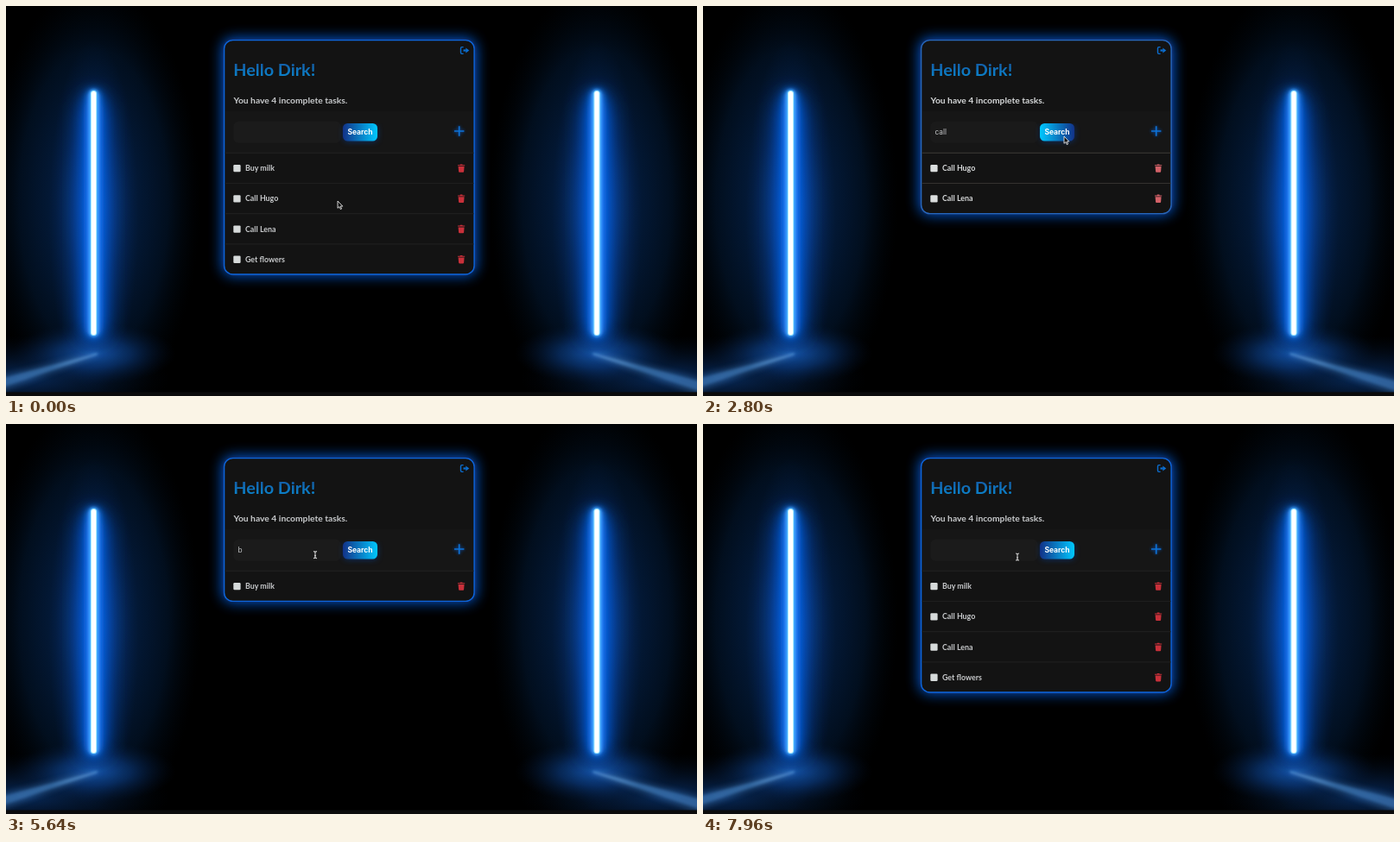
These frames come from a looping animation (800x452 px, 8 s). An HTML page:

```html
<!DOCTYPE html>
<html lang="en">
<head>
<meta charset="utf-8">
<title>Task list</title>
<style>
  html, body { margin: 0; width: 100%; height: 100%; overflow: hidden; background: #000; }
  svg { display: block; width: 800px; height: 452px; }
  text { font-family: Lato, "Open Sans", sans-serif; font-weight: 700; white-space: pre; }
  .ui { font-family: Inter, Roboto, sans-serif; }
</style>
</head>
<body>
<svg viewBox="0 0 800 452">
  <defs>
    <filter id="soft" filterUnits="userSpaceOnUse" x="-60" y="0" width="920" height="470"><feGaussianBlur stdDeviation="1.6"/></filter>
    <filter id="medium" filterUnits="userSpaceOnUse" x="-60" y="0" width="920" height="470"><feGaussianBlur stdDeviation="3.5"/></filter>
    <filter id="wide" filterUnits="userSpaceOnUse" x="-60" y="0" width="920" height="470"><feGaussianBlur stdDeviation="7.5"/></filter>
    <filter id="broad" filterUnits="userSpaceOnUse" x="-60" y="0" width="920" height="470"><feGaussianBlur stdDeviation="13"/></filter>
    <radialGradient id="haze">
      <stop offset="0" stop-color="#0a48a0" stop-opacity=".7"/>
      <stop offset=".35" stop-color="#06306a" stop-opacity=".55"/>
      <stop offset=".7" stop-color="#031a36" stop-opacity=".55"/>
      <stop offset="1" stop-color="#010a14" stop-opacity="0"/>
    </radialGradient>
    <radialGradient id="halo">
      <stop offset="0" stop-color="#1670f0" stop-opacity=".5"/>
      <stop offset="1" stop-color="#063a90" stop-opacity="0"/>
    </radialGradient>
    <radialGradient id="floor">
      <stop offset="0" stop-color="#0b3c82" stop-opacity=".7"/>
      <stop offset="1" stop-color="#04142c" stop-opacity="0"/>
    </radialGradient>
    <radialGradient id="pool">
      <stop offset="0" stop-color="#1a6ad0" stop-opacity=".75"/>
      <stop offset=".45" stop-color="#0d4596" stop-opacity=".5"/>
      <stop offset="1" stop-color="#04183a" stop-opacity="0"/>
    </radialGradient>
    <linearGradient id="beam" gradientUnits="userSpaceOnUse" x1="0" x2="106" y1="0" y2="0">
      <stop offset="0" stop-color="#3a72b0" stop-opacity=".85"/>
      <stop offset=".5" stop-color="#3f7ab8" stop-opacity=".85"/>
      <stop offset="1" stop-color="#7ab4ea"/>
    </linearGradient>
    <linearGradient id="titleFill" x1="0" y1="0" x2="0" y2="1">
      <stop offset=".2" stop-color="#145ca6"/><stop offset=".9" stop-color="#0a84cc"/>
    </linearGradient>
    <linearGradient id="buttonFill" gradientUnits="userSpaceOnUse" x1="0" x2="80" y1="0" y2="0">
      <stop offset="0" stop-color="#123288"/><stop offset=".5" stop-color="#00c8ff"/><stop offset="1" stop-color="#123288"/>
    </linearGradient>
    <g id="lamp">
      <ellipse cx="101.5" cy="226" rx="124" ry="252" fill="url(#haze)"/>
      <ellipse cx="20" cy="432" rx="170" ry="50" fill="url(#floor)"/>
      <ellipse cx="101.5" cy="403" rx="95" ry="36" fill="url(#pool)"/>
      <path d="M106 402L-20 433V452L106 404Z" fill="url(#beam)" opacity=".6" filter="url(#medium)"/>
      <path d="M106 402.3L-20 436V447L106 404Z" fill="url(#beam)" opacity=".7" filter="url(#soft)"/>
      <ellipse cx="101.5" cy="245" rx="52" ry="205" fill="url(#halo)"/>
      <rect x="89" y="108" width="25" height="276" rx="12" fill="#0a55d8" filter="url(#broad)"/>
      <rect x="93" y="98" width="17" height="286" rx="8" fill="#0c68f0" filter="url(#wide)"/>
      <rect x="95" y="97" width="13" height="286" rx="6" fill="#2b90ff" filter="url(#medium)"/>
      <rect x="96.5" y="97" width="10" height="286" rx="5" fill="#4db2ff" filter="url(#soft)"/>
      <rect x="98" y="98" width="7" height="284" rx="3.5" fill="#a9ecff"/>
      <rect x="99" y="99" width="5" height="282" rx="2.5" fill="#fff"/>
    </g>
    <path id="bin" d="M523 185.2v-1h2.4l.5-.8h2.4l.5.8h2.4v1zM523.6 186h7l-.5 6q-.1.8-.9.8h-4.2q-.8 0-.9-.8z"/>
  </defs>

  <rect width="800" height="452"/>
  <g id="room">
    <use href="#lamp"/>
    <use href="#lamp" transform="translate(785.5) scale(-1 1)"/>
  </g>
  <rect y="447.5" width="800" height="5" fill="#0b0b0c"/>
  <rect id="strip" width="800" height="39" fill="#161616"/>

  <rect id="glow" x="250" y="37" width="295" rx="13" fill="#0a5fe0" filter="url(#wide)"/>
  <rect id="card" x="252.6" y="39.6" width="289.5" rx="10" fill="#131313" stroke-width="1.4"/>
  <rect x="254" y="122" width="287" height="48" fill="#161616"/>
  <g id="logout" fill="none" stroke="#0b6ed0" stroke-width="1.4">
    <path d="M529.6 47.6h-1.8q-1.3 0-1.3 1.3v5.2q0 1.3 1.3 1.3h1.8"/>
    <path d="M529.5 51.5h3" stroke-width="2.2"/>
    <path d="M532.3 48.4v6.2l4-3.1z" fill="#0b6ed0" stroke="none"/>
  </g>
  <text x="263.3" y="81" font-size="19.8" fill="url(#titleFill)">Hello Dirk!</text>
  <text class="ink" x="263.4" y="112.6" font-size="10.3">You have 4 incomplete tasks.</text>
  <rect id="field" y="133.8" height="25" rx="6"/>
  <rect id="selection" x="269" y="141" width="14" height="10.5" fill="#56728f"/>
  <text id="query" class="ui" y="149.4" font-size="8.3" style="font-weight:400"></text>
  <rect id="caret" y="141.5" width=".8" height="9.5" fill="#ddd"/>
  <g id="button">
    <rect x="1" y="2" width="39" height="19" rx="5" fill="#0a49b8" opacity=".5" filter="url(#medium)"/>
    <rect width="40" height="20.6" rx="5.5" fill="url(#buttonFill)"/>
    <text class="ui" x="20" y="13.4" font-size="8.5" fill="#fff" text-anchor="middle">Search</text>
  </g>
  <path d="M518.5 145h12M524.5 139v12" stroke="#0a4fb0" stroke-width="4" opacity=".5" filter="url(#soft)"/>
  <path id="plus" d="M519 145h11.4M524.7 139.3v11.4" stroke="#0c73d8" stroke-width="1.6"/>
  <g id="rows"></g>

  <path id="arrow" d="M0 0v8.3l1.9-1.7 1.4 3 1.3-.6-1.4-2.9h2.6z" fill="#111" stroke="#fff" stroke-width=".8"/>
  <path id="ibeam" d="M-2-4q2 0 2 1.3Q0-4 2-4M0-3V3M-2 4q2 0 2-1.3Q0 4 2 4M-1 1H1" fill="none" stroke="#d0d0d0" stroke-width="1.1"/>
</svg>
<script>
const LOOP = 8000, FLASH = 80, FADE = 300, ROW = 35.2;
const tasks = ["Buy milk", "Call Hugo", "Call Lena", "Get flowers"];
const el = id => document.getElementById(id);
const set = (node, attrs) => { for (const k in attrs) node.setAttribute(k, attrs[k]); };
const show = (node, on) => set(node, { visibility: on ? "visible" : "hidden" });
const clamp = v => Math.min(1, Math.max(0, v));
const ease = v => v * v * (3 - 2 * v);
const ramp = (t, start, length) => ease(clamp((t - start) / length));
const mix = (a, b, k) => `rgb(${a.map((v, i) => Math.round(v + (b[i] - v) * k))})`;
const latest = (list, t) => list.filter(e => e[0] <= t).pop();

// [time, value] lists
const typed = [[0, ""], [900, "c"], [1040, "ca"], [1180, "cal"], [1320, "call"],
  [4280, "b"], [6300, "ba"], [6960, "b"], [7080, ""]];
const loads = [[0, tasks], [2520, tasks.slice(1, 3)], [4800, tasks.slice(0, 1)], [7440, tasks]];
const focus = [[0, false], [760, true], [2400, false], [3360, true], [4800, false], [5960, true], [7440, false]];
const pointer = [[0, true], [900, false], [1640, true], [4280, false], [5480, true], [6300, false], [7640, true]];
// [start, duration, x, y]
const moves = [[0, 1, 384, 226], [280, 440, 345, 149], [1640, 440, 418, 151],
  [2860, 420, 355, 150.5], [5480, 420, 364, 154]];

const NS = "http://www.w3.org/2000/svg";
const rows = tasks.map((_, i) => {
  const g = document.createElementNS(NS, "g");
  g.innerHTML = `<path class="rule" d="M253.5 170.3H541.5" stroke-width="1.2"/>
    <rect class="box" x="263.3" y="184" width="8.3" height="8.3" rx="1.2"/>
    <text class="ink" x="277" y="191.2" font-size="8.85"></text><use class="bin" href="#bin"/>`;
  set(g, { transform: `translate(0 ${i * ROW})` });
  el("rows").append(g);
  return g;
});
const paint = (selector, attr, color) =>
  document.querySelectorAll(selector).forEach(n => n.setAttribute(attr, color));

function pointerAt(t) {
  let [, , x, y] = moves[0];
  for (const [start, length, tx, ty] of moves) {
    const k = ramp(t, start, length);
    x += (tx - x) * k;
    y += (ty - y) * k;
  }
  return [x, y];
}

function drawPage(t) {
  const [loaded, list] = latest(loads, t);
  const age = loaded ? t - loaded : LOOP;
  const flash = age < FLASH;
  const k = ramp(age, FLASH, FADE);
  const height = 131 + ROW * list.length;

  set(el("room"), { transform: flash ? "translate(4 51.4) scale(1 .894)" : "" });
  show(el("strip"), flash);
  show(el("logout"), !flash);
  set(el("glow"), { height: height + 4, opacity: flash ? 1 : .9 });
  set(el("card"), { height: height - .4, stroke: mix([118, 108, 98], [12, 102, 222], k),
    "stroke-width": flash ? 1 : 1.4 });
  set(el("plus"), { "stroke-width": flash ? 1 : 1.6 });

  rows.forEach((row, i) => {
    row.style.display = i < list.length ? "" : "none";
    row.querySelector("text").textContent = list[i] || "";
  });
  paint(".rule", "stroke", mix([118, 108, 98], [30, 30, 30], k));
  paint(".ink", "fill", mix([255, 255, 255], [200, 202, 204], k));
  paint(".box", "fill", mix([235, 235, 235], [214, 218, 218], k));
  paint(".bin", "fill", mix([240, 240, 240], [200, 48, 58], k));
  return k;
}

function drawSearch(t, k) {
  const [focusedAt, focused] = latest(focus, t);
  const [typedAt, value] = latest(typed, t);
  const selected = t >= 3440 && t < 4280;
  const left = focused ? 269.5 : 268.5;
  set(el("field"), { x: focused ? 263.9 : 263.3, width: focused ? 125.6 : 124.5,
    fill: mix([22, 22, 22], [27, 27, 27], k),
    stroke: focused ? "#0c66de" : "none", "stroke-width": 1.4 });
  const query = el("query");
  query.textContent = value;
  set(query, { x: left, fill: mix([235, 235, 235], [190, 192, 194], k) });
  show(el("selection"), selected);

  const blink = (t - Math.max(typedAt, focusedAt)) % 1000 < 500;
  const width = value ? query.getComputedTextLength() : 0;
  set(el("caret"), { x: left + width + .3 });
  show(el("caret"), focused && !selected && blink);

  set(el("button"), { transform: `translate(${focused ? 392.3 : 390} 136)` });
  const hover = ramp(t, 2000, 300) - ramp(t, 2960, 300);
  set(el("buttonFill"), { gradientTransform: `translate(${-40 * hover})` });
}

function drawPointer(t) {
  const [x, y] = pointerAt(t);
  const visible = latest(pointer, t)[1];
  const overField = x > 263 && x < 389 && y > 133 && y < 159;
  set(el("arrow"), { transform: `translate(${x} ${y})` });
  set(el("ibeam"), { transform: `translate(${x} ${y})` });
  show(el("arrow"), visible && !overField);
  show(el("ibeam"), visible && overField);
}

function frame() {
  const t = performance.now() % LOOP;
  drawSearch(t, drawPage(t));
  drawPointer(t);
  requestAnimationFrame(frame);
}
frame();
</script>
</body>
</html>
```
